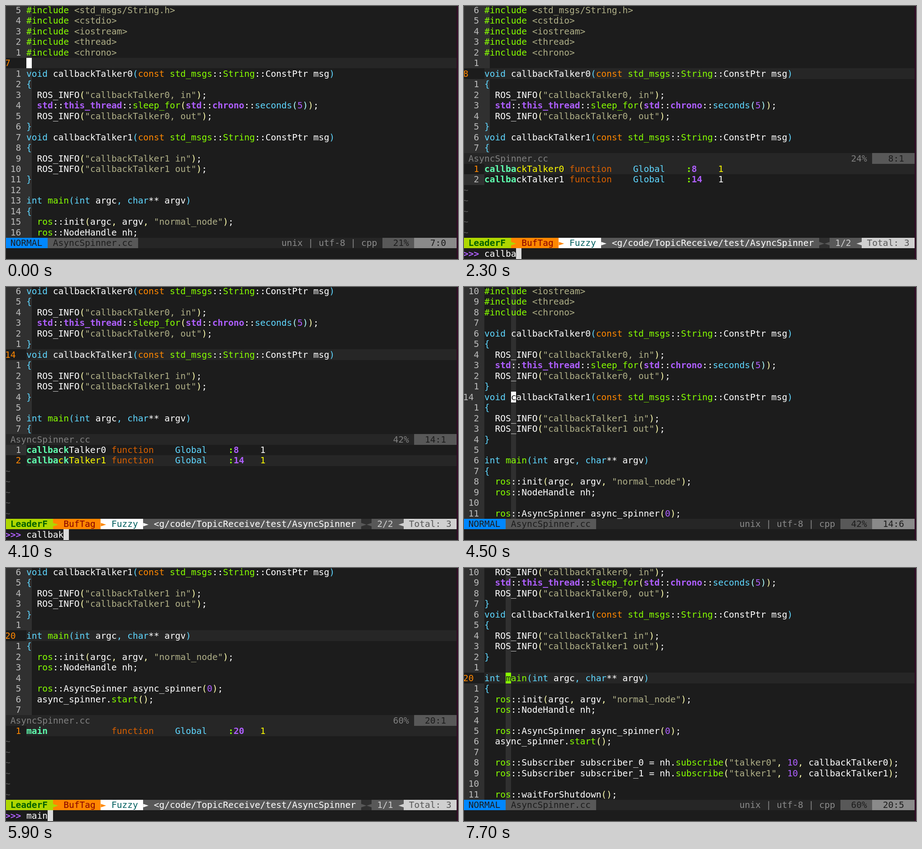
An HTML page with a canvas that plays this animation: 999x561 px, repeating every 8200 ms.

```html
<!DOCTYPE html>
<html lang="en">
<head>
<meta charset="utf-8">
<title>Jumping between functions in a terminal editor</title>
<style>
html, body { margin: 0; width: 100%; height: 100%; overflow: hidden; background: #1c1c1c; }
canvas { display: block; }
</style>
</head>
<body>
<canvas id="stage" width="999" height="561"></canvas>
<script>
const ctx = document.getElementById('stage').getContext('2d');
const LOOP = 8200, COLS = 85, CELL_W = 11.745, CELL_H = 23.48;
const BG = '#1c1c1c', BAR = '#262626', GUTTER = '#303030', GREY = '#585858', DIM = '#808080',
  SILVER = '#d0d0d0', WHITE = '#ffffff', GREEN = '#87ff00', CYAN = '#5fd7ff', PURPLE = '#af5fff',
  ORANGE = '#ff8700', STRING = '#afaf87', LINE_NR = '#bcbcbc', YELLOW = '#ffff00';
const BRACKETS = [CYAN, '#ffffaf', '#afffff'];

const SOURCE = `#include <ros/ros.h>
#include <std_msgs/String.h>
#include <cstdio>
#include <iostream>
#include <thread>
#include <chrono>

void callbackTalker0(const std_msgs::String::ConstPtr msg)
{
  ROS_INFO("callbackTalker0, in");
  std::this_thread::sleep_for(std::chrono::seconds(5));
  ROS_INFO("callbackTalker0, out");
}
void callbackTalker1(const std_msgs::String::ConstPtr msg)
{
  ROS_INFO("callbackTalker1 in");
  ROS_INFO("callbackTalker1 out");
}

int main(int argc, char** argv)
{
  ros::init(argc, argv, "normal_node");
  ros::NodeHandle nh;

  ros::AsyncSpinner async_spinner(0);
  async_spinner.start();

  ros::Subscriber subscriber_0 = nh.subscribe("talker0", 10, callbackTalker0);
  ros::Subscriber subscriber_1 = nh.subscribe("talker1", 10, callbackTalker1);

  ros::waitForShutdown();
  return 0;
}`;

const TAGS = [['callbackTalker0', 8], ['callbackTalker1', 14], ['main', 20]];

// Syntax colouring; bracket depth carries over from line to line
let depth = 0;
function colorOf(word) {
  if (/^["<]/.test(word)) return STRING;
  if (/^[({]$/.test(word)) return BRACKETS[depth++];
  if (/^[)}]$/.test(word)) return BRACKETS[--depth];
  if (word === ',') return BRACKETS[depth - 1];
  if (/^(void|int|char|seconds)$/.test(word)) return CYAN;
  if (/^(#include|std_msgs|String|ros|main|sleep_for|start|subscribe)$/.test(word)) return GREEN;
  if (/^(std|this_thread|chrono|\d+)$/.test(word)) return PURPLE;
  return /^(const|return)$/.test(word) ? ORANGE : WHITE;
}
const CODE = SOURCE.split('\n').map(line =>
  [...line.matchAll(/"[^"]*"|<[^>]*>|#?\w+|\S/g)].map(m => ({
    col: m.index, text: m[0], color: colorOf(m[0]), bold: /^(std|this_thread|chrono)$/.test(m[0])
  })));

// Timeline: an open finder has a query, a plain editor has none
const first = { line: 7, col: 0, start: 2 };
const second = { line: 14, col: 6, start: 4 };
const third = { line: 20, col: 5, start: 10 };
const SCENES = [
  [0, first],
  [600, { ...first, query: '' }],
  [1100, { ...first, query: '', blink: true }],
  [1600, { query: 'ca' }],
  [1800, { query: 'cal' }],
  [1900, { query: 'call' }],
  [2200, { query: 'callb' }],
  [2300, { query: 'callba' }],
  [3600, { query: 'callba', pick: 1 }],
  [3700, { query: 'callbak' }],
  [4100, { query: 'callbak', pick: 1 }],
  [4500, { ...second, plain: true }],
  [4700, second],
  [5300, { ...second, query: '' }],
  [5600, { query: 'm' }],
  [5700, { query: 'ma' }],
  [5800, { query: 'mai' }],
  [5900, { query: 'main' }],
  [6300, { ...third, plain: true }],
  [6400, third],
  [7200, { ...third, blink: true }],
  [7700, third]
];

const cellX = col => Math.round(col * CELL_W - 2);
const cellY = row => Math.round(row * CELL_H - 2.6);

function fill(col, row, width, color, rows = 1) {
  ctx.fillStyle = color;
  ctx.fillRect(cellX(col), cellY(row), cellX(col + width) - cellX(col), cellY(row + rows) - cellY(row));
}

function put(col, row, text, color, bold) {
  ctx.font = `${bold ? 'bold ' : ''}19.6px "DejaVu Sans Mono", monospace`;
  ctx.fillStyle = color;
  [...text].forEach((ch, i) => ctx.fillText(ch, (col + i) * CELL_W - 2, row * CELL_H + 15.8));
}

function block(col, row, text, color, back, bold) {
  fill(col, row, text.length, back);
  put(col, row, text, color, bold);
}

function drawCode({ line, col, start, plain }, rows) {
  const column = Math.max(col - 1, 0);
  fill(0, 0, 4, GUTTER, rows);
  fill(4 + column, 0, 1, GUTTER, rows);
  for (let row = 0; row < rows; row++) {
    const n = start + row, current = n === line;
    if (current && !plain) {
      fill(0, row, 4, BG);
      fill(4, row, COLS - 4, BAR);
    }
    const label = current ? String(n) : String(Math.abs(n - line)).padStart(3);
    put(0, row, label, current && !plain ? ORANGE : LINE_NR);
    for (const t of CODE[n - 1]) put(4 + t.col, row, t.text, t.color, t.bold);
  }
}

function drawCursor({ line, col, start }) {
  const at = Math.max(col - 1, 0);
  const token = CODE[line - 1].find(t => at >= t.col && at < t.col + t.text.length);
  const ch = token ? token.text[at - token.col] : ' ';
  block(4 + at, line - start, ch, BG, token ? token.color : WHITE);
}

const percent = line => Math.floor(line / CODE.length * 100) + '%';
const position = s => `${s.line}:${s.col}`.padStart(6) + '  ';

function drawEditor(s) {
  drawCode(s, 22);
  if (!s.blink) drawCursor(s);
  fill(0, 22, COLS, BAR);
  block(0, 22, ' NORMAL ', BG, '#0087ff');
  block(8, 22, ' AsyncSpinner.cc ', BG, GREY);
  put(52, 22, 'unix | utf-8 | cpp', '#8a8a8a');
  block(71, 22, `  ${percent(s.line)} `, BG, GREY);
  block(77, 22, position(s), BG, '#8a8a8a');
}

// Positions of the query letters inside a name, or null if one is missing
function match(name, query) {
  const hits = [];
  let from = 0;
  for (const ch of query) {
    const i = name.indexOf(ch, from);
    if (i < 0) return null;
    hits.push(i);
    from = i + 1;
  }
  return hits;
}

function drawTag([name, line], hits, row, index, picked) {
  const color = picked ? YELLOW : WHITE;
  fill(0, row, 4, picked ? BG : GUTTER);
  if (picked) fill(4, row, COLS - 4, BAR);
  put(2, row, String(index + 1), picked ? ORANGE : LINE_NR);
  [...name].forEach((ch, i) => {
    const hit = hits.includes(i);
    put(4 + i, row, ch, hit ? '#5fffaf' : color, hit);
  });
  put(20, row, 'function', '#d75f00');
  put(32, row, 'Global', CYAN);
  put(42, row, ':', GREEN, true);
  put(43, row, String(line), PURPLE, true);
  put(48, row, '1', color);
}

function drawFinder({ query, pick = 0, blink, ...view }) {
  const found = TAGS.filter(([name]) => match(name, query));
  if (query) {
    const line = found[pick][1];
    view = { line, col: 1, start: line - 6 };
  }
  drawCode(view, 14);
  fill(0, 14, COLS, BAR);
  put(1, 14, 'AsyncSpinner.cc', DIM);
  put(73, 14, percent(view.line), DIM);
  block(77, 14, position(view), BG, GREY);

  found.forEach((tag, i) => drawTag(tag, match(tag[0], query), 15 + i, i, i === pick));
  for (let row = 15 + found.length; row < 22; row++) put(0, row, '~', GREY);

  block(0, 22, ' LeaderF ', '#005f00', '#afd700', true);
  block(9, 22, '►', '#afd700', ORANGE);
  block(10, 22, ' BufTag ', '#870000', ORANGE);
  block(18, 22, '►', ORANGE, WHITE);
  block(19, 22, ' Fuzzy ', '#005f5f', WHITE);
  block(26, 22, '►', WHITE, GREY);
  block(27, 22, ' <g/code/TopicReceive/test/AsyncSpinner ', WHITE, GREY);
  block(67, 22, '►◄', GREY, GUTTER);
  block(69, 22, ` ${pick + 1}/${found.length} `, SILVER, GREY);
  block(74, 22, '◄', SILVER, GREY);
  block(75, 22, ` Total: ${TAGS.length} `, GREY, SILVER);

  put(0, 23, '>>>', PURPLE, true);
  put(4, 23, query, WHITE);
  if (!blink) fill(4 + query.length, 23, 1, '#dadada');
}

function draw() {
  const time = performance.now() % LOOP;
  const scene = SCENES.filter(([from]) => from <= time).pop()[1];
  ctx.fillStyle = '#300a24';
  ctx.fillRect(0, 0, 999, 561);
  fill(0, 0, COLS, BG, 24);
  if (scene.query === undefined) drawEditor(scene);
  else drawFinder(scene);
  requestAnimationFrame(draw);
}
draw();
</script>
</body>
</html>
```
